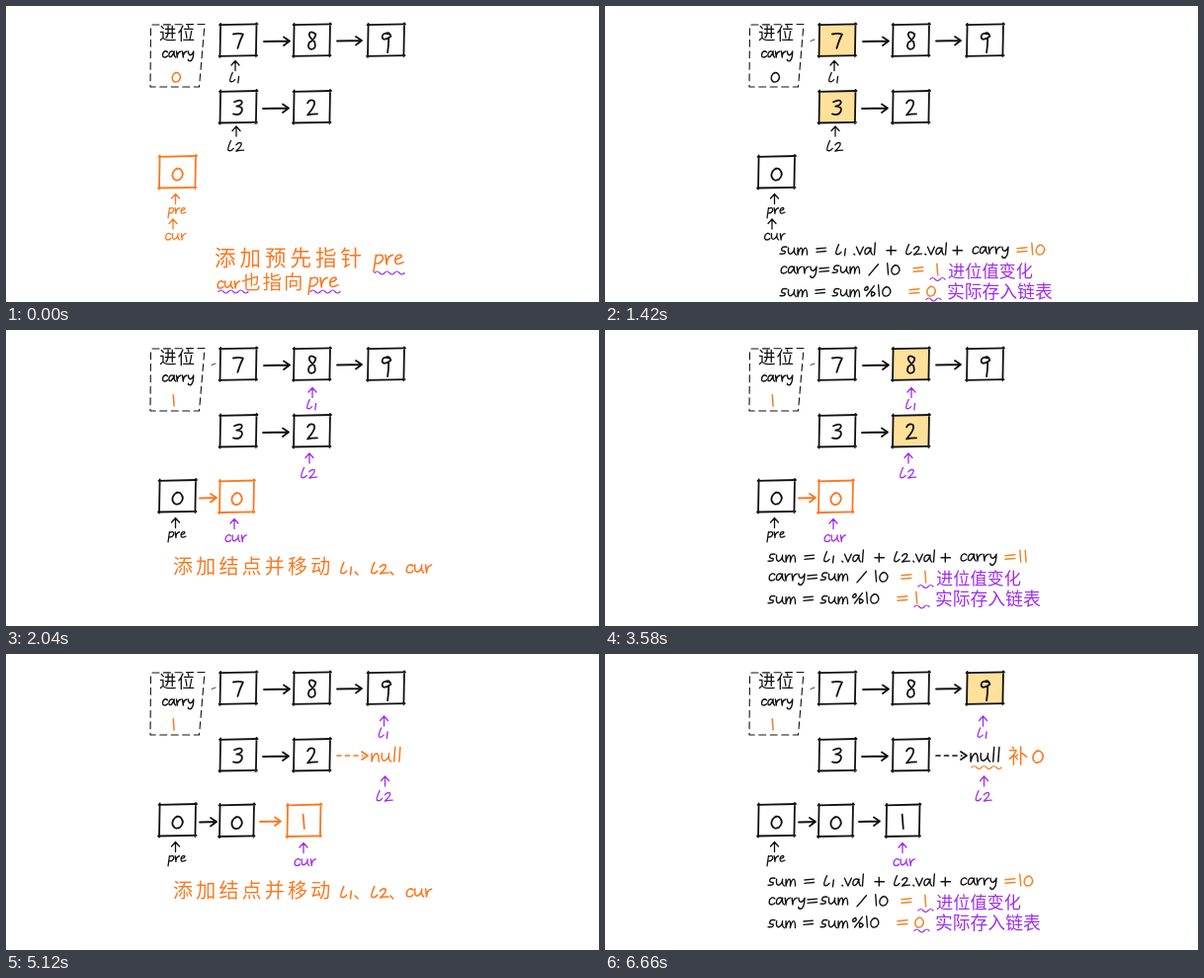
These frames come from a looping animation (600x300 px, 8000 ms). An HTML page:

```html
<!DOCTYPE html>
<html lang="zh">
<head>
<meta charset="utf-8">
<title>链表相加</title>
<style>
html, body { margin: 0; width: 100%; height: 100%; overflow: hidden; background: #fff; }
svg { display: block; width: 100vw; height: 100vh; }
path { stroke-linecap: round; stroke-linejoin: round; }
text { font-family: "Noto Sans CJK SC", "Noto Sans CJK", sans-serif; }
</style>
</head>
<body>
<svg id="stage" viewBox="0 0 600 300"></svg>
<script>
const INK = '#111', ORANGE = '#fb7820', AMBER = '#f0862a', PURPLE = '#a12cf0', YELLOW = '#ffe19b';
const LOOP = 8000, STARTS = [0, 500, 2040, 3580, 5120, 6660];

// Pen strokes: [advance, path], baseline at 0 and x-height 9. L is the curved list name.
const PEN = {
  s: [9, 'M8-9Q3-10 2-7T6-4Q7 0 0-1'],
  u: [11, 'M1-8Q0 0 4-1Q8-3 8-8Q7-2 10 0'],
  m: [14, 'M1-8L1 0Q3-8 5-8Q7-7 6 0Q8-8 10-8Q12-8 12 0'],
  c: [9, 'M8-7Q5-10 2-6Q0 0 4 0Q7 0 8-2'],
  a: [10, 'M8-7Q3-10 1-5Q0 1 4-1Q7-4 8-8Q7-2 10 0'],
  r: [8, 'M1-8L2 0Q2-7 7-8'],
  y: [10, 'M1-8Q1-3 4-3Q7-4 8-8Q8 3 4 5Q0 5 1 3'],
  v: [9, 'M0-9L4 0L8-9'],
  p: [9, 'M2-8L0 6M2-7Q8-10 8-5Q6 0 1-1'],
  e: [8, 'M1-4Q8-6 6-8Q2-9 1-4Q1 2 8-2'],
  n: [10, 'M1-8L1 0Q3-8 6-8Q8-7 8 0'],
  l: [5, 'M3-14L2 0'],
  L: [9, 'M4-12Q0-3 1-1Q4 1 7-3'],
  '₁': [6, 'M3-7L2 1'],
  '₂': [11, 'M1-7Q4-11 7-9Q8-6 1 0Q5-1 10-1'],
  0: [12, 'M5-11Q0-8 1-3Q3 2 8-1Q12-5 9-9Q7-12 4-10'],
  1: [6, 'M2-13L3 0'],
  2: [11, 'M1-11Q3-15 7-13Q9-9 1 0Q5-1 10-1'],
  3: [10, 'M1-12Q7-15 8-12Q8-9 3-8Q9-8 8-4Q6 1 0-1'],
  7: [10, 'M0-13Q5-14 9-13Q6-7 4 0'],
  8: [10, 'M8-13Q3-17 2-13Q2-10 7-6Q9 1 4 1Q0 0 2-5Q8-9 8-13'],
  9: [10, 'M7-13Q1-15 1-10Q2-6 9-11Q8-15 5-14M7-9Q7-3 6 4'],
  '+': [11, 'M0-5H11M5-10V0'],
  '=': [12, 'M0-7L11-8M0-3L11-4'],
  '/': [12, 'M11-12L0 1'],
  '%': [15, 'M4-11Q0-10 1-7Q4-6 5-9Q5-11 3-11M12-12L3 0M10-5Q8-4 9 0Q12 0 13-3Q12-5 9-5'],
  '.': [4, 'M1-1L2 0'],
  '、': [6, 'M1-2L4 1']
};

const stroke = (d, color = INK, width = 1.6, extra = '') =>
  `<path d="${d}" fill="none" stroke="${color}" stroke-width="${width}" ${extra}/>`;

function pen(word, x, y, size, color = INK, width = 1.4) {
  let at = 0, out = '';
  for (const ch of word) {
    const [advance, d] = PEN[ch];
    out += stroke(d, color, width / size, `transform="translate(${at})"`);
    at += advance;
  }
  return `<g role="img" aria-label="${word}" transform="translate(${x} ${y}) scale(${size})">${out}</g>`;
}

const han = (s, x, y, size, color, gap = 0, weight = 300) =>
  `<text x="${x}" y="${y}" font-size="${size}" fill="${color}" letter-spacing="${gap}" font-weight="${weight}">${s}</text>`;

function box(digit, x, y, w, color = INK, fill = 'none') {
  const r = x + w, b = y + 32.5;
  return `<rect x="${x}" y="${y}" width="${w}" height="32.5" fill="${fill}"/>` +
    stroke(`M${x - .5} ${y + .8}L${r + 1} ${y}M${r} ${y - 1}L${r - .6} ${b + .5}M${r + .5} ${b - .6}L${x - 1} ${b}M${x + .6} ${y - .5}L${x} ${b + 1}`, color, 1.8) +
    pen(digit, x + w / 2 - PEN[digit][0] / 2, y + 24.5, 1.1, color, 1.8);
}

const arrow = (x, y, end, color = INK) =>
  stroke(`M${x} ${y + .5}L${end} ${y}m-6-4l6 4l-6 4.5`, color, 1.8);

const dashArrow = color =>
  stroke('M335 103H361', color, 1.7, 'stroke-dasharray="4 4.5"') +
  stroke('M360 99l6 4l-6 4', color, 1.7);

const pointer = (x, y, color) => stroke(`M${x} ${y + 10}V${y}m-4 4.5l4-4.5l4 4.5`, color, 1.3);

const wave = (x, y, width, color = PURPLE) =>
  stroke(`M${x} ${y}q2.5-3 5 0${'t5 0'.repeat(Math.round(width / 5) - 1)}`, color, 1.2);

const listPointers = (x1, y1, x2, y2, color) =>
  pointer(x1, y1, color) + pen('L₁', x1 - 6, y1 + 21.5, .8, color, 1.3) +
  pointer(x2, y2, color) + pen('L₂', x2 - 9, y2 + 25, .88, color, 1.3);

const pre = (color = INK) => pointer(171.5, 190.5, color) + pen('pre', 164, 210.5, .72, color, 1.3);
const cur = (x, color = PURPLE) => pointer(x, 191.5, color) + pen('cur', x - 10, 214.5, .83, color, 1.3);

function carryBox(digit, color, tick) {
  return stroke('M148 19L201 18.5L195.5 82L146 82L146.5 20', INK, 1.1, 'stroke-dasharray="7 4.5"') +
    han('进位', 155, 34, 17.5, INK, 1, 500) + pen('carry', 157.5, 52, .75, INK, 1.4) +
    pen(digit, 167.5, 77, .87, color, 1.5) +
    (tick ? stroke('M208 35.5L212 34', INK, .8) : '');
}

const inputs = hot =>
  [['7', 216.5, 18.3], ['8', 291, 18.3], ['9', 366, 18.3], ['3', 216.5, 86], ['2', 291, 86]]
    .map(([d, x, y]) => box(d, x, y, 37, INK, hot.includes(d) ? YELLOW : 'none')).join('') +
  arrow(261, 35.5, 287) + arrow(335, 35, 360) + arrow(260, 103.5, 286);

function formulas(total, digit, dx, dy) {
  const words = [
    ['sum', 177, 252], ['=', 214, 252], ['L₁', 233, 252], ['.val', 251, 252], ['+', 285, 252],
    ['L₂', 304, 252], ['.val', 323, 252], ['+', 352, 252], ['carry', 371, 251],
    ['carry', 177, 271], ['=', 217, 272], ['sum', 230, 271], ['/', 267, 272], ['10', 284, 272],
    ['sum', 177, 294.5], ['=', 213, 294], ['sum', 230, 294.5], ['%10', 262, 294]
  ];
  const results = [['=', 417, 252], [total, 430, 252], ['=', 312, 272], [total[0], 334, 273],
    ['=', 308, 294], [digit, 325, 294]];
  return `<g transform="translate(${dx} ${dy})">` +
    words.map(([w, x, y]) => pen(w, x, y, .86)).join('') +
    results.map(([w, x, y]) => pen(w, x, y, .9, AMBER, 1.5)).join('') +
    wave(329, 277, 15) + wave(325, 297.5, 15) +
    han('进位值变化', 347, 275, 17.2, PURPLE) + han('实际存入链表', 346, 296, 17.8, PURPLE) + '</g>';
}

const moveCaption = () =>
  han('添加结点并移动', 169, 247, 20, ORANGE, 3.2) +
  pen('L₁、', 338, 247, .95, ORANGE, 1.6) + pen('L₂、', 369, 247, .95, ORANGE, 1.6) +
  pen('cur', 404, 246, .98, ORANGE, 1.6);

const startCaption = () =>
  han('添加预先指针', 211, 263, 21.5, ORANGE, 4) + pen('pre', 372, 262, 1.2, ORANGE, 1.6) +
  pen('cur', 213, 286, .87, ORANGE, 1.6) + han('也指向', 238, 286.5, 19.5, ORANGE, 2) +
  pen('pre', 306, 285, 1.2, ORANGE, 1.6) +
  wave(373, 270.5, 30) + wave(215, 289.5, 30) + wave(308, 289.5, 30);

const head = color => box('0', 155, 152, 37, color) + pre(color) +
  pointer(169, 216, color) + pen('cur', 160.5, 237, .8, color, 1.3);

const firstNode = color => box('0', 155, 152, 37) + pre() +
  arrow(196, 170, 213, color) + box('0', 216, 152.5, 35, color);

const secondNode = color => arrow(257, 169.5, 278, color) + box('1', 284.5, 152.5, 34, color);

const tailNull = color => dashArrow(color) + pen('null', 369, 109, 1.03, color, 1.5);

const scenes = [
  () => carryBox('0', ORANGE) + inputs('') + listPointers(232, 55.5, 233, 122, INK) +
    head(ORANGE) + startCaption(),
  () => carryBox('0', INK, true) + inputs('73') + listPointers(232, 55.5, 233, 122, INK) +
    head(INK) + formulas('10', '0', 0, 0),
  () => carryBox('1', ORANGE, true) + inputs('') + listPointers(310, 58.5, 307, 125, PURPLE) +
    firstNode(ORANGE) + cur(231) + moveCaption(),
  () => carryBox('1', ORANGE, true) + inputs('82') + listPointers(310, 58.5, 307, 125, PURPLE) +
    firstNode(ORANGE) + cur(231) + formulas('11', '1', -12, -17),
  () => carryBox('1', ORANGE, true) + inputs('') + listPointers(382.5, 63, 383.5, 124, PURPLE) +
    tailNull(ORANGE) + firstNode(INK) + secondNode(ORANGE) + cur(301) + moveCaption(),
  () => carryBox('1', ORANGE, true) + inputs('9') + listPointers(382.5, 63, 383.5, 124, PURPLE) +
    tailNull(INK) + wave(371, 115, 30, ORANGE) + han('补', 408, 111, 20, ORANGE) +
    pen('0', 432, 110, 1.1, ORANGE, 1.6) +
    firstNode(INK) + secondNode(INK) + cur(301) + formulas('10', '0', -12, -17)
];

const stage = document.getElementById('stage');
const began = performance.now();
let shown = -1;

function update(ms) {
  const t = ms % LOOP;
  const index = STARTS.filter(start => start <= t).length - 1;
  if (index !== shown) {
    shown = index;
    stage.innerHTML = scenes[index]();
  }
}

function tick() {
  update(performance.now() - began);
  requestAnimationFrame(tick);
}
tick();
</script>
</body>
</html>
```
